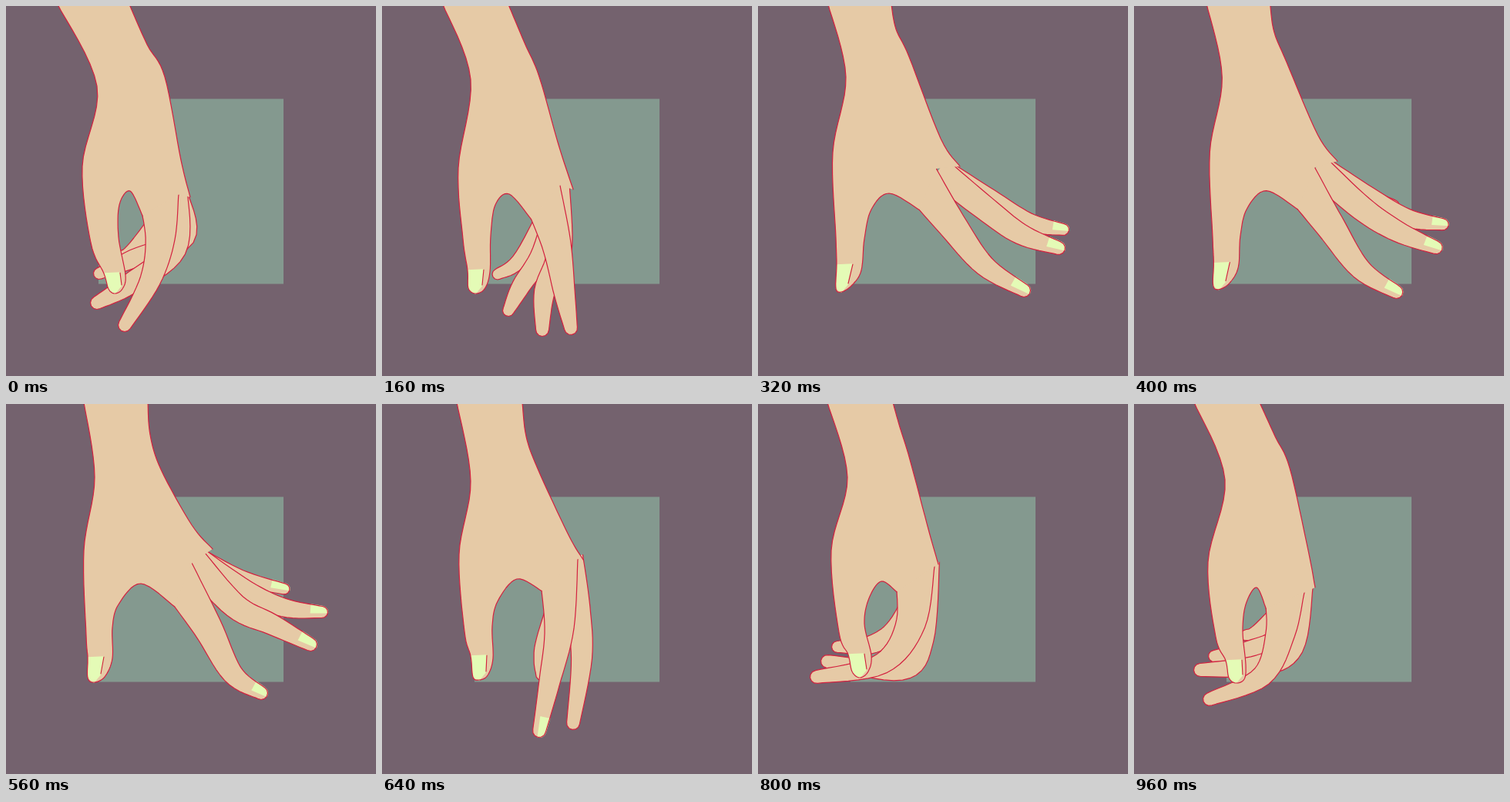
Write an HTML page that moves like this. It is 480 by 480 pixels and loops after 1.04 s.

```html
<!DOCTYPE html>
<html lang="en">
<head>
<meta charset="utf-8">
<title>Hand</title>
<style>
html, body { margin: 0; width: 100%; height: 100%; overflow: hidden; background: #74626e; }
svg { display: block; width: 100vw; height: 100vh; }
.skin { fill: #e6caa6; }
.nail { fill: #e4fbb6; stroke: #e4fbb6; stroke-width: 1.5; stroke-linejoin: round; }
.line { fill: none; stroke: #d3213f; stroke-width: 1.2; stroke-linejoin: round; stroke-linecap: round; }
</style>
</head>
<body>
<svg id="stage" viewBox="0 0 480 480">
  <rect width="480" height="480" fill="#74626e"/>
  <rect x="120" y="120.5" width="240" height="240" fill="#84998f"/>
</svg>
<script>
const STEP = 80, STEPS = 13, DETAIL = 8;

// Half-widths from knuckle to tip, and how far each knuckle lies
// from the index knuckle towards the outer edge of the palm
const FINGERS = {
  index:  { radii: [26, 19, 13.5, 8.5], spread: 0 },
  mid:    { radii: [18, 16, 13.5, 8.5], spread: 0.45 },
  ring:   { radii: [12, 13, 12, 7.5], spread: 0.6 },
  little: { radii: [11, 10, 7], spread: 0.6 }
};
const NAMES = Object.keys(FINGERS);
const LAYERS = [...NAMES].reverse().concat('palm');

// left: wrist, thumb (nail corner and tip are the 5th to 7th) and web
// side: outer knuckle up to the arm; fingers: joints down to the tip
// nails: how many fingers show one, counted from the index
const POSES = [
  { at: 0, nails: 0,
    left: '67,-2 118,104 99,208 110,307 127,347 133,367 141,373 151,367 155,349 146,300 147,258 161,240',
    side: '239,248 227,200 206,92 183,50 160,-2',
    index: '198,246 200,302 187,356 154,414',
    mid: '218,315 160,361 118,385', ring: '232,300 165,328 121,347', little: '168,314 148,325' },
  { at: 160, nails: 0,
    left: '79,-2 115,95 99,210 105,302 111,343 112,366 121,373 133,367 140,345 141,298 147,258 165,244',
    side: '248,238 229,180 204,92 185,48 164,-2',
    index: '206,240 226,308 237,374 245,418',
    mid: '230,318 211,370 208,420', ring: '208,318 180,364 164,395', little: '182,325 150,348' },
  { at: 320, nails: 3,
    left: '91,-2 114,92 97,190 101,300 102,336 101,366 108,371 122,362 134,343 138,302 147,264 170,243',
    side: '262,208 237,172 196,66 179,30 173,-2',
    index: '210,226 251,283 294,337 345,369',
    mid: '294,262 341,296 390,314', ring: '300,250 350,280 396,290', little: '280,245 325,268' },
  { at: 560, nails: 4,
    left: '101,-2 115,95 101,190 104,300 106,329 106,355 114,361 128,354 138,330 138,290 146,260 175,233',
    side: '268,188 241,157 201,85 187,40 184,-2',
    index: '219,220 261,289 294,350 331,375',
    mid: '297,262 345,286 395,312', ring: '312,242 360,264 410,270', little: '304,225 361,240' },
  { at: 640, nails: 1,
    left: '97,-2 115,100 100,195 107,295 115,327 118,354 126,358 137,352 144,330 143,288 150,256 175,227',
    side: '261,202 242,170 202,84 187,42 182,-2',
    index: '228,202 230,290 217,362 204,424',
    mid: '254,265 259,330 248,414', ring: '215,300 209,332 207,351', little: '222,290 220,330' },
  { at: 800, nails: 0,
    left: '90,-2 116,95 95,190 105,296 117,325 122,347 132,355 143,347 147,326 138,285 144,252 160,230',
    side: '234,208 222,166 197,72 184,30 175,-2',
    index: '203,210 198,285 160,337 76,354',
    mid: '212,305 185,345 90,334', ring: '185,283 150,311 103,315', little: '188,300 165,318' },
  { at: 960, nails: 0,
    left: '78,-2 118,98 96,205 106,302 119,333 123,355 132,362 143,357 145,338 141,295 145,260 159,238',
    side: '235,238 226,190 202,83 183,42 163,-2',
    index: '195,243 190,297 166,353 98,383',
    mid: '204,315 162,339 86,345', ring: '190,300 150,319 104,327', little: '165,292 145,300' }
];
const PARTS = ['left', 'side', ...NAMES];
for (const pose of POSES)
  for (const k of PARTS) pose[k] = pose[k].split(' ').map(p => p.split(',').map(Number));

const lerp = (a, b, t) => a.map((v, i) => v + (b[i] - v) * t);
const poly = pts => 'M' + pts.map(p => p[0].toFixed(1) + ',' + p[1].toFixed(1)).join('L');

// Catmull-Rom samples through points of any dimension
function smooth(keys) {
  const at = i => keys[Math.max(0, Math.min(keys.length - 1, i))];
  const out = [keys[0]];
  for (let i = 0; i < keys.length - 1; i++) {
    const [a, b, c, d] = [at(i - 1), at(i), at(i + 1), at(i + 2)];
    for (let s = 1; s <= DETAIL; s++) {
      const t = s / DETAIL;
      out.push(b.map((v, k) => v + t / 2 * (c[k] - a[k] +
        t * (2 * a[k] - 5 * v + 4 * c[k] - d[k] + t * (3 * (v - c[k]) + d[k] - a[k])))));
    }
  }
  return out;
}

// Tapered finger with a round tip around a bent spine
function tube(joints, radii) {
  const spine = smooth(joints.map((p, i) => [...p, radii[i]]));
  const last = spine.length - 1, inner = [], outer = [], cap = [];
  spine.forEach(([x, y, r], i) => {
    const a = spine[Math.max(0, i - 1)], b = spine[Math.min(last, i + 1)];
    const dir = Math.atan2(b[1] - a[1], b[0] - a[0]);
    const rim = turn => [x + r * Math.cos(dir + turn), y + r * Math.sin(dir + turn)];
    inner.push(rim(Math.PI / 2));
    outer.push(rim(-Math.PI / 2));
    if (i === last) for (let k = 2; k >= -2; k--) cap.push(rim(k * Math.PI / 6));
  });
  const back = last - 3;
  const nail = [lerp(inner[back], outer[back], 0.4), ...cap.slice(2), ...outer.slice(back).reverse()];
  return { inner, outer, nail, outline: [...inner, ...cap, ...outer.reverse()], root: outer[outer.length - 1] };
}

function poseAt(time) {
  let i = POSES.length - 1;
  while (POSES[i].at > time) i--;
  const a = POSES[i], b = POSES[i + 1] || a;
  const t = a === b ? 0 : (time - a.at) / (b.at - a.at);
  const pose = { nails: Math.round(a.nails + (b.nails - a.nails) * t) };
  for (const k of PARTS) pose[k] = a[k].map((p, j) => lerp(p, b[k][j], t));
  return pose;
}

function shapes(pose) {
  const { left, side, index } = pose, out = {};
  const tubes = NAMES.map((name, i) => {
    const { radii, spread } = FINGERS[name];
    const knuckle = lerp(lerp(index[0], side[0], spread), side[1], 0.1);
    const f = tube(i ? [knuckle, ...pose[name]] : index, radii), d = poly(f.outline);
    out[name] = { skin: d, line: d, nail: i < pose.nails ? poly(f.nail) : '' };
    return f;
  });

  // the web runs into the inner edge of the index finger
  const rim = smooth([...left, tubes[0].inner[DETAIL / 2]]), edge = smooth(side);
  const [corner, tipLeft, tip] = left.slice(4, 7);
  const nail = [corner, [corner[0] + 21, corner[1] - 1], [tip[0] + 9, tip[1] - 11], tip, tipLeft];
  out.palm = {
    skin: poly([...rim, tubes[0].root, ...edge]),
    nail: poly(nail),
    line: poly(rim) + poly(edge) + poly(nail.slice(1, 3))
  };
  return out;
}

const stage = document.getElementById('stage');
function addPath(cls) {
  const el = document.createElementNS('http://www.w3.org/2000/svg', 'path');
  el.setAttribute('class', cls);
  return stage.appendChild(el);
}
const paths = {};
for (const k of LAYERS) paths[k] = { skin: addPath('skin'), nail: addPath('nail'), line: addPath('line') };

function draw(step) {
  const parts = shapes(poseAt(step * STEP));
  for (const k of LAYERS)
    for (const kind in paths[k]) paths[k][kind].setAttribute('d', parts[k][kind]);
}

let shown = -1;
function tick() {
  const step = Math.floor(performance.now() / STEP) % STEPS;
  if (step !== shown) draw(shown = step);
  requestAnimationFrame(tick);
}
tick();
</script>
</body>
</html>
```
